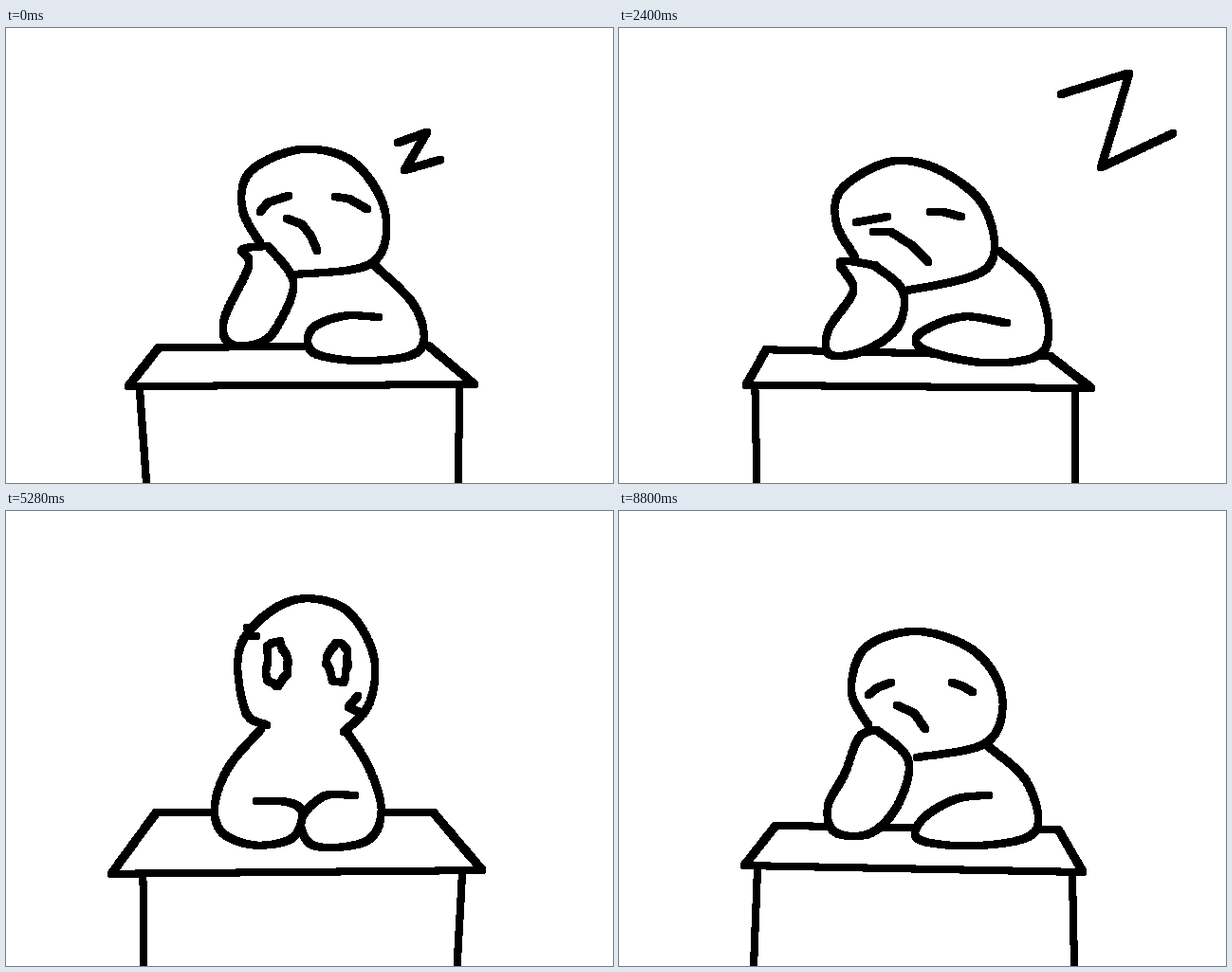
An HTML page with a canvas for the animation above (8.96 s loop, 640x480 px).

```html
<!DOCTYPE html>
<html lang="en">
<head>
<meta charset="utf-8">
<title>Desk nap</title>
<style>
html, body { margin: 0; width: 100%; height: 100%; overflow: hidden; background: #fff; }
canvas { display: block; width: 640px; height: 480px; }
</style>
</head>
<body>
<canvas id="stage" width="640" height="480"></canvas>
<script>
const ctx = document.getElementById('stage').getContext('2d');
const STEP = 160, FRAMES = 56;

const path = s => s.split(' ').map(p => p.split(',').map(Number));
const mix = (a, b, t) => a + (b - a) * t;
const mixPath = (a, b, t) => a.map((p, i) => [mix(p[0], b[i][0], t), mix(p[1], b[i][1], t)]);
const ring = (cx, cy, rx, ry) => Array.from({ length: 17 }, (_, i) =>
  [cx + rx * Math.cos(i * Math.PI / 8), cy + ry * Math.sin(i * Math.PI / 8)]);

// Head, arm and body are curves through key points, equal in number so that poses blend.
// A desk lists its corners; a leg runs from one x to another at the bottom edge.
const doze = {
  parity: 0,
  head: path('268,227 249,190 258,151 312,128 367,142 400,195 386,248 306,260'),
  arm: path('276,230 249,234 256,251 230,307 236,333 268,332 287,313 303,268 276,230'),
  body: path('386,248 432,295 436,340 380,351 325,343 322,318 355,304 393,305'),
  desk: path('161,337 129,378 494,376 445,335'),
  legs: path('141,148 478,477'),
  face: ['268,194 276,184 298,177', '347,178 362,180 381,191', '296,201 312,207 322,220 328,235'].map(path)
};

const dozeAlt = {
  parity: 1,
  head: path('263,226 245,190 260,144 315,127 375,148 404,195 388,244 314,260'),
  arm: path('272,231 253,239 238,277 220,312 228,339 265,340 294,310 305,263 272,231'),
  body: path('389,248 430,286 439,338 380,353 317,347 320,325 355,304 390,300'),
  desk: path('165,332 132,374 489,381 463,336'),
  legs: path('146,142 478,480'),
  face: ['263,194 273,186 287,181', '351,181 363,185 373,191', '293,205 311,213 323,230'].map(path)
};

const slump = {
  parity: 0,
  head: path('250,243 227,205 235,168 290,142 342,151 385,192 388,255 298,277'),
  arm: path('270,252 235,246 248,277 219,319 222,343 262,341 294,315 297,276 270,252'),
  body: path('400,235 446,279 449,338 390,354 325,341 318,322 360,306 407,311'),
  desk: path('155,338 136,377 498,381 453,345'),
  legs: path('144,144 479,482'),
  face: ['250,205 281,198', '328,193 343,194 361,200', '269,214 284,216 309,229 328,246'].map(path)
};

const slam = {
  parity: 1,
  headOnTop: true,
  head: path('228,353 217,325 240,271 315,250 375,266 431,318 400,350 238,356'),
  arm: path('238,270 208,246 178,244 157,264 178,281 190,305 193,332 200,353 221,358'),
  body: path('216,246 270,237 320,232 378,233 430,256 460,300 448,337 420,348'),
  desk: path('153,331 121,379 496,376 456,337'),
  legs: path('151,146 484,480'),
  face: ['250,284 288,307 239,309', '367,290 348,299 387,304', '262,318 285,316 304,321',
    '355,314 367,314', '420,297 440,297'].map(path)
};

const awake = {
  parity: 0,
  head: path('276,227 250,210 247,140 300,97 355,101 385,150 384,203 358,232'),
  arm: path('268,231 237,268 221,310 226,340 262,351 304,346 312,318 295,306 265,307'),
  body: path('358,232 385,273 396,315 378,349 326,354 313,325 335,302 366,300'),
  desk: path('158,317 113,383 502,380 449,317'),
  legs: path('145,144 479,477'),
  face: [ring(285, 161, 11, 24), ring(350, 160, 11, 21),
    ...['255,122 256,133 264,132', '370,195 363,208 377,213'].map(path)]
};

const stare = {
  parity: 1,
  head: path('267,244 226,227 223,165 275,125 340,124 394,159 403,212 366,241'),
  arm: path('250,240 212,262 183,308 194,340 245,348 289,336 294,308 270,298 234,299'),
  body: path('366,241 408,263 427,310 400,344 338,350 316,325 335,301 378,295'),
  desk: path('155,310 111,385 508,384 449,314'),
  legs: path('147,142 476,474'),
  face: [ring(264, 181, 27, 11), ring(341, 183, 31, 10)]
};

const timeline = [
  [0, doze], [6, doze], [10, slump], [15, slump], [18, slam], [22, slam],
  [25, awake], [36, awake], [39, stare], [50, stare], [53, doze], [55, doze]
];

const snores = [
  { born: 0, fade: 10, gone: 13,
    small: path('413,121 444,110 420,150 458,139'), large: path('485,43 566,24 500,129 562,115') },
  { born: 10, fade: 17, gone: 25,
    small: path('421,129 444,125 425,151 459,143'), large: path('475,58 557,32 525,146 609,105') }
];

const impact = [
  '136,222 132,239 85,242 74,238 80,246 50,246 8,220 40,247 60,302 32,309 60,328 84,371',
  '482,240 480,262 490,271 515,273 573,259 558,287 600,290 640,282 585,329 575,347 601,350 558,374'
].map(path);
const dots = path('187,140 165,179 173,226 449,152 459,190 454,226');

function stamp(x, y) {
  x = Math.round(x);
  y = Math.round(y);
  ctx.fillRect(x - 4, y - 3, 8, 6);
  ctx.fillRect(x - 3, y - 4, 6, 8);
}

function drawLine(points) {
  for (let i = 1; i < points.length; i++) {
    const [x0, y0] = points[i - 1], [x1, y1] = points[i];
    const n = Math.max(1, Math.ceil(Math.hypot(x1 - x0, y1 - y0)));
    for (let k = 0; k <= n; k++) stamp(mix(x0, x1, k / n), mix(y0, y1, k / n));
  }
}

// Catmull-Rom curve through the key points.
function smooth(points, steps = 10) {
  const at = i => points[Math.max(0, Math.min(points.length - 1, i))];
  const curve = [];
  for (let i = 0; i < points.length - 1; i++) {
    for (let k = 0; k < steps; k++) {
      const t = k / steps;
      curve.push([0, 1].map(axis => {
        const [a, b, c, d] = [-1, 0, 1, 2].map(j => at(i + j)[axis]);
        return b + t / 2 * (c - a + t * (2 * a - 5 * b + 4 * c - d + t * (3 * (b - c) + d - a)));
      }));
    }
  }
  return [...curve, at(points.length - 1)];
}

// A white shape that hides what lies behind it, with a black outline.
function drawShape(points) {
  const curve = smooth(points);
  ctx.fillStyle = '#fff';
  ctx.beginPath();
  curve.forEach(p => ctx.lineTo(...p));
  ctx.fill();
  ctx.fillStyle = '#000';
  drawLine(curve);
}

const wobble = (points, seed) => points.map(([x, y], i) =>
  [x + 2 * Math.sin(i * 1.7 + seed * 3), y + 1.5 * Math.sin(i * 2.3 + seed)]);

function poseAt(frame) {
  const next = timeline.findIndex(key => key[0] >= frame);
  const [end, target] = timeline[next];
  const [start, from] = timeline[Math.max(0, next - 1)];
  const to = target === doze && frame % 2 ? dozeAlt : target;
  const t = end === start ? 1 : (frame - start) / (end - start);
  if (from === target || t === 1) return { ...to, shaky: frame % 2 !== to.parity };
  const blend = { ...(t < 0.5 ? from : to), shaky: false };
  for (const part of ['head', 'arm', 'body', 'desk', 'legs']) {
    blend[part] = mixPath(from[part], to[part], t);
  }
  return blend;
}

function drawFigure(pose) {
  const shake = (points, seed) => pose.shaky ? wobble(points, seed) : points;
  const desk = shake(pose.desk, 1);
  drawLine([...desk, desk[0]]);
  shake(pose.legs, 2).forEach(([top, bottom], i) => drawLine([[top, desk[i + 1][1] + 4], [bottom, 480]]));
  const order = pose.headOnTop ? ['body', 'arm', 'head'] : ['body', 'head', 'arm'];
  order.forEach((part, i) => drawShape(shake(pose[part], i + 3)));
  pose.face.forEach((line, i) => drawLine(shake(line, i)));
}

function drawSnore({ born, fade, gone, small, large }, frame) {
  if (frame < born || frame >= gone) return;
  const drift = 3 * Math.max(0, frame - fade);
  const grey = 255 * Math.max(0, frame - fade) / (gone - fade);
  const letter = mixPath(small, large, Math.min(1, (frame - born) / 6));
  ctx.fillStyle = `rgb(${grey},${grey},${grey})`;
  drawLine(letter.map(([x, y]) => [x + drift, y - drift]));
}

function draw(frame) {
  ctx.fillStyle = '#fff';
  ctx.fillRect(0, 0, 640, 480);
  snores.forEach(snore => drawSnore(snore, frame));
  ctx.fillStyle = '#000';
  // The stare holds one extra beat before sleep returns.
  drawFigure(poseAt(frame === 50 ? 49 : frame));
  if (frame >= 18 && frame <= 20) {
    impact.forEach((line, i) => drawLine(frame === 19 ? line : wobble(line, i)));
  }
  if (frame >= 45 && frame <= 50) dots.forEach(p => stamp(...p));
}

let shown = -1;
const startTime = performance.now();
function tick() {
  const frame = Math.floor((performance.now() - startTime) / STEP) % FRAMES;
  if (frame !== shown) draw(shown = frame);
  requestAnimationFrame(tick);
}
tick();
</script>
</body>
</html>
```
